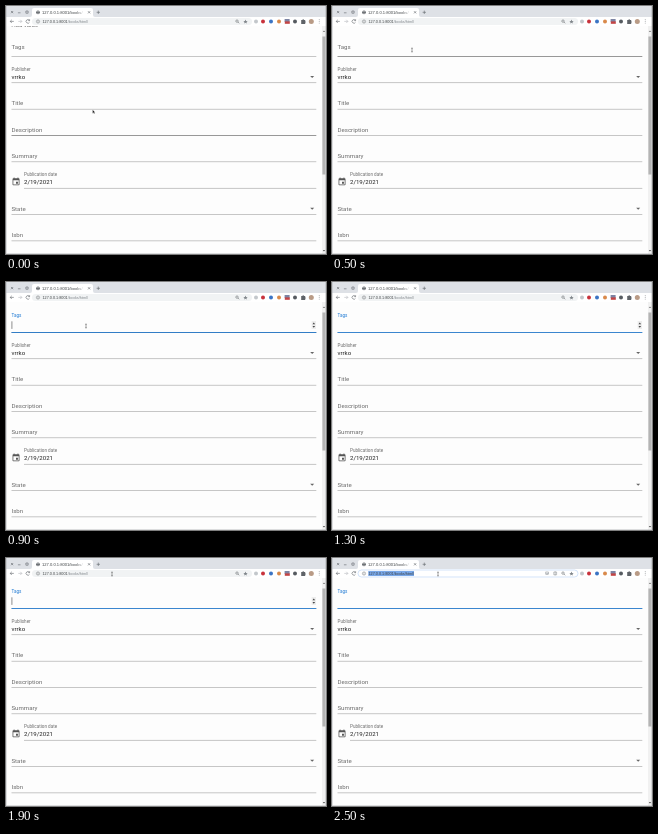
An HTML page for the animation above (3000 ms loop, 320 by 248 pixels).

```html
<!DOCTYPE html>
<html lang="en">
<head>
<meta charset="utf-8">
<title>Book form</title>
<style>
html, body { margin: 0; width: 100%; height: 100%; overflow: hidden; background: #fff; }
svg { display: block; width: 100vw; height: 100vh; }
text { font-family: Roboto, sans-serif; white-space: pre; }
.ui { font-family: "Liberation Sans", Arial, sans-serif; }
</style>
</head>
<body>
<svg id="stage" viewBox="0 0 320 248" preserveAspectRatio="none">
  <defs>
    <clipPath id="view"><rect x="0" y="20" width="316" height="228"/></clipPath>
    <linearGradient id="fade">
      <stop offset="0" stop-color="#fff" stop-opacity="0"/>
      <stop offset="1" stop-color="#fff"/>
    </linearGradient>
  </defs>
  <rect width="320" height="248" fill="#fdfdfd"/>
  <g id="form" clip-path="url(#view)"></g>
  <g id="scrollbar"></g>
  <g id="chrome"></g>
  <g id="focusBar"></g>
  <path d="M.25 0V247.75H319.75V0" fill="none" stroke="#a4a7ab" stroke-width=".5"/>
  <g id="arrow"><path d="M0 0v3.6l.85-.8.6 1.3.6-.3-.6-1.2h1.15z" fill="#111" stroke="#fff" stroke-width=".25"/></g>
  <g id="beam"><path d="M-.9-2Q0-2 0-1.5Q0-2 .9-2M0-1.6V1.6M-.9 2Q0 2 0 1.5Q0 2 .9 2" fill="none" stroke="#444" stroke-width=".5"/></g>
</svg>
<script>
const LOOP = 3000, STEP = 100;
const BLUE = '#1976d2', GREY = '#6b6b6b', INK = '#222', LINE = '#8f8f8f';
const $ = id => document.getElementById(id);
const rect = (x, y, w, h, fill, more = '') =>
  `<rect x="${x}" y="${y}" width="${w}" height="${h}" fill="${fill}" ${more}/>`;
const dot = (x, y, r, fill, more = '') =>
  `<circle cx="${x}" cy="${y}" r="${r}" fill="${fill}" ${more}/>`;
const text = (x, y, size, fill, s, more = '') =>
  `<text x="${x}" y="${y}" font-size="${size}" fill="${fill}" ${more}>${s}</text>`;
const stroke = (d, color = '#5f6368', w = .6) =>
  `<path d="${d}" fill="none" stroke="${color}" stroke-width="${w}"/>`;
const fill = (d, color) => `<path d="${d}" fill="${color}"/>`;
const lens = (x, y) => stroke(`M${x + .9} ${y + .9}l1.3 1.3`) + dot(x, y, 1.2, 'none', 'stroke="#5f6368" stroke-width=".55"');

// Form fields, placed by their underlines at an even pitch
const TOP = 50.2, PITCH = 26.35;
const fields = [
  { label: 'Tags', id: 'tags' },
  { label: 'Publisher', value: 'vrrko', menu: true },
  { label: 'Title' },
  { label: 'Description' },
  { label: 'Summary' },
  { label: 'Publication date', value: '2/19/2021', x: 18 },
  { label: 'State', menu: true },
  { label: 'Isbn' }
];

function field({ label, value, menu, id, x = 5.5 }, i) {
  const y = TOP + i * PITCH;
  let out = value
    ? text(x, y - 11.6, 4.6, GREY, label) + text(x, y - 3.6, 6.1, INK, value)
    : text(x, y - 3.7, 6.1, GREY, label, id ? `id="${id}"` : '');
  if (menu) out += fill(`M304.2 ${y - 6.5}h4l-2 2z`, '#666');
  return out + rect(x, y, 310.3 - x, .5, LINE, `id="line${i}"`);
}

const EVENT = 'M17 12h-5v5h5zM16 1v2H8V1H6v2H5a2 2 0 0 0-2 2v14a2 2 0 0 0 2 2h14a2 2 0 0 0 2-2V5a2 2 0 0 0-2-2h-1V1zm3 18H5V8h14z';

$('form').innerHTML =
  text(5.5, 20.8, 6.1, GREY, 'Add value', 'id="above"') +
  fields.map(field).join('') +
  `<g transform="translate(5.4 171.2) scale(.385)"><path d="${EVENT}" fill="#555" fill-rule="evenodd"/></g>` +
  rect(5.5, 50.1, 0, .8, BLUE, 'id="ripple"') +
  rect(5.7, 39.3, .5, 7.6, '#222', 'id="caret"') +
  `<g id="spinner">${rect(305.6, 39, 4.4, 8, '#ededed')}${fill('M306.5 42.2h2.6l-1.3-1.7zM306.5 44h2.6l-1.3 1.7z', '#444')}</g>`;

$('scrollbar').innerHTML =
  rect(316, 20, 4, 228, '#f1f1f1') + rect(316.4, 30.5, 3, 138, '#b4b4b4') +
  fill('M316.8 26h2.4l-1.2-1.6z', '#777') + fill('M316.8 244h2.4l-1.2 1.6z', '#555');

const extensions = [[250, '#c3c7cb'], [257, '#c8323c'], [265, '#3b74c4'], [273, '#d98a4b'], [289, '#565b60']];
const URL_HOST = '127.0.0.1:8001';

$('chrome').innerHTML =
  rect(0, 0, 320, 11, '#dee1e6') + rect(0, 11, 320, 9, '#fff') +
  stroke('M5 5l2.2 2.2M7.2 5L5 7.2M11.9 6.8h2.6M19.9 5h2.2v2.2h-2.2z') +
  fill('M24 11q2 0 2-2V4q0-2 2-2h57q2 0 2 2v5q0 2 2 2z', '#fff') +
  dot(32, 6.3, 1.9, '#5f6368') + stroke('M30.4 5.6h3M31 7.3h2.3', '#fff', .4) +
  text(36, 7.8, 4.1, '#3c4043', URL_HOST + '/books/', 'class="ui"') +
  rect(70, 3, 9, 7, 'url(#fade)') +
  stroke('M82 5.2l2.2 2.2M84.2 5.2L82 7.4') + stroke('M90.6 6.3h3.4M92.3 4.6V8') +
  stroke('M7.8 15.4H4.2M5.8 13.8l-1.6 1.6 1.6 1.6') +
  stroke('M12.3 15.4h3.6M14.3 13.8l1.6 1.6-1.6 1.6', '#b5b8bc') +
  stroke('M23.4 14.4a1.8 1.8 0 1 0 .1 1.8M23.6 13.2v1.4h-1.4') +
  rect(26, 12, 220, 7, '#f1f3f4', 'rx="3.5" id="pill"') +
  dot(32, 15.5, 1.6, 'none', 'stroke="#5f6368" stroke-width=".45"') + stroke('M32 15.2v1.2M32 14.3v.4', '#5f6368', .45) +
  rect(36.3, 13, 45.7, 5, '#78a7e8', 'id="selection"') +
  `<text class="ui" x="36.5" y="16.9" font-size="3.78" fill="#3c4043">${URL_HOST}<tspan id="path" fill="#80868b">/books/html/</tspan></text>` +
  lens(231, 15.1) +
  fill('M239.5 13.4l.6 1.5 1.6.1-1.2 1 .4 1.6-1.4-.9-1.4.9.4-1.6-1.2-1 1.6-.1z', '#80868b') +
  extensions.map(([x, c]) => dot(x, 15.4, 2, c)).join('') +
  rect(278.6, 13, 5, 3, '#7d84a3') + rect(278.8, 15.4, 5, 2.4, '#c34444') +
  fill('M295.2 14h1.2a.8.8 0 0 1 1.6 0h1.2v1.3a.8.8 0 0 1 0 1.5v1.1h-4z', '#5f6368') +
  dot(305.3, 15.4, 2.5, '#b99b86') +
  [13.7, 15.4, 17.1].map(y => dot(313.2, y, .45, '#5f6368')).join('');

$('focusBar').innerHTML =
  rect(213.8, 14, 2.8, 2.6, 'none', 'stroke="#80868b" stroke-width=".5"') + stroke('M214.2 15.4h2', '#80868b') +
  stroke('M221.8 14h2.8v2.8h-2.8zM223.2 13.4v4', '#80868b', .5) +
  rect(83, 13.2, .4, 4.6, '#222', 'id="urlCaret"');

// Pointer stops: time, x, y; a null x hides it
const route = [
  [0, 86.6, 103.8], [100, 86, 100], [500, 80, 44], [900, 80, 44],
  [1200, 140, 23.5], [1300, null], [1600, 114, 21], [1900, 106, 16], [3000, 106, 16]
];
const clamp = v => Math.max(0, Math.min(1, v));
const ease = v => v * v * (3 - 2 * v);
const mix = (a, b, p) => a + (b - a) * p;

function pointer(t) {
  const i = route.findIndex(r => r[0] > t) - 1;
  const [t0, x0, y0] = route[i], [t1, x1, y1] = route[i + 1];
  if (x0 === null) return null;
  if (x1 === null) return { x: x0, y: y0 };
  const p = ease((t - t0) / (t1 - t0));
  return { x: mix(x0, x1, p), y: mix(y0, y1, p) };
}

const show = (id, on) => $(id).setAttribute('visibility', on ? 'visible' : 'hidden');
const set = (id, attrs) => { for (const k in attrs) $(id).setAttribute(k, attrs[k]); };

function draw(ms) {
  const t = Math.floor((ms % LOOP) / STEP) * STEP;
  const at = pointer(t);
  const hover = at ? Math.floor((at.y - TOP) / PITCH) + 1 : -1;
  const beam = at && (hover === 0 || at.y < 20);
  show('beam', beam);
  show('arrow', at && !beam);
  if (at) set(beam ? 'beam' : 'arrow', { transform: `translate(${at.x} ${at.y})` });

  show('above', t < 100);
  fields.forEach((f, i) => set('line' + i, { fill: i === hover ? '#333' : LINE }));

  const p = ease(clamp((t - 650) / 200));
  set('tags', { y: mix(43.2, 34.6, p), 'font-size': mix(6.1, 4.6, p), fill: t >= 700 ? BLUE : GREY });
  set('ripple', { x: mix(158, 5.5, p), width: 304.8 * p });

  const inUrlBar = t >= 2100, picked = t >= 2200;
  show('spinner', t >= 700 && !inUrlBar);
  show('caret', (t >= 700 && t < 1300) || (t >= 1800 && !inUrlBar));
  show('focusBar', inUrlBar);
  $('urlCaret').style.display = picked ? 'none' : '';
  show('selection', picked);
  set('path', { fill: picked ? '#3c4043' : '#80868b' });
  set('pill', inUrlBar
    ? { fill: '#fff', stroke: '#b5d0f5', 'stroke-width': .6 }
    : { fill: '#f1f3f4', stroke: 'none' });
}

const start = performance.now();
function tick() {
  draw(performance.now() - start);
  requestAnimationFrame(tick);
}
tick();
</script>
</body>
</html>
```
